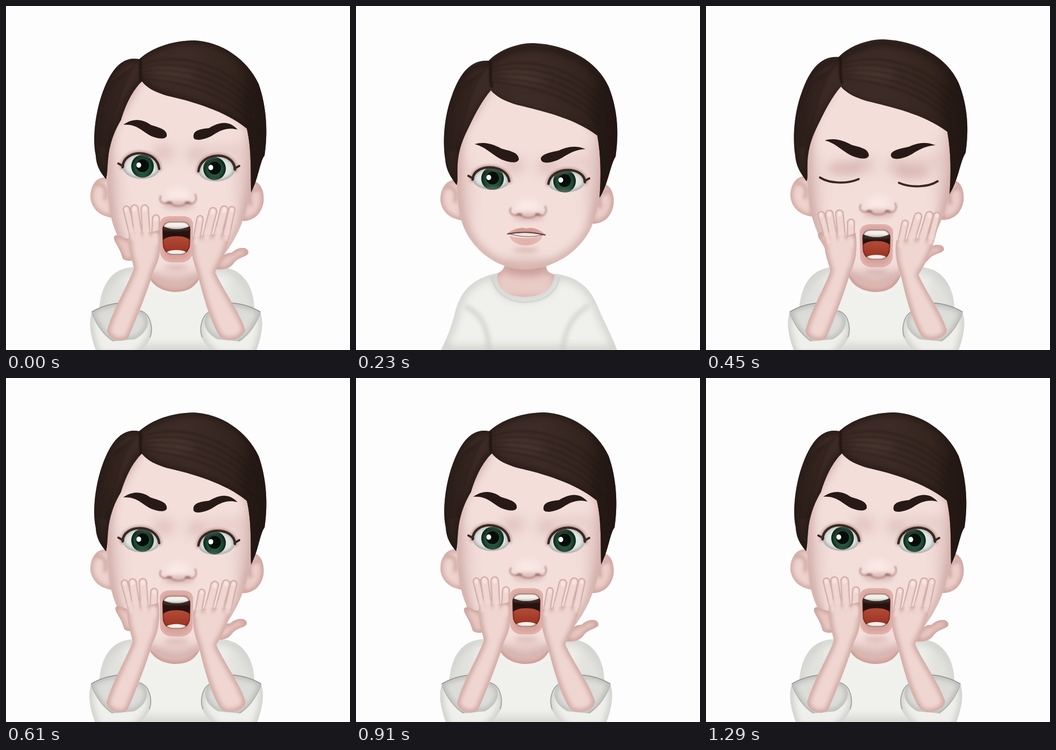
These frames come from a looping animation (640x640 px, 1370 ms). An HTML page with a canvas:

```html
<!DOCTYPE html>
<html lang="en">
<head>
<meta charset="utf-8">
<title>Shouting avatar</title>
<style>
  html, body { margin: 0; height: 100%; overflow: hidden; background: #fdfdfd; }
  canvas { display: block; width: 100vw; height: 100vh; }
</style>
</head>
<body>
<canvas width="640" height="640"></canvas>
<script>
const ctx = document.querySelector('canvas').getContext('2d');
const LOOP = 1370;
const STARTS = [0, 80, 150, 230, 300, 380, 450, 530, 610, 680, 760, 830, 910, 990, 1060, 1140, 1210, 1290];
const SKIN = '#f3deda', SKIN_EDGE = '#c9a29d', ROSE = 'rgba(200,160,158,.4)';
const SHIRT = '#f0f0ed', SHIRT_EDGE = '#cbcbc8', FOLD = 'rgba(178,178,174,.6)';
const LASH = '#3a2722';

const FIELDS = ['tilt', 'lift', 'eyeY', 'open', 'noseY', 'jaw', 'mouthY', 'reach', 'settle'];
const KEYS = [
  [80, .1, -3, 317, .87, 391, 0, 421, 300, 1],
  [230, 0, 0, 321, .87, 395, 0, 425, 300, 1],
  [300, 0, 1, 322, .6, 396, .1, 425, 200, 1],
  [380, 0, -4, 320, .05, 392, .8, 418, 50, 1],
  [450, 0, -7, 320, 0, 389, 1.15, 416, 0, 1],
  [530, .7, -2, 308, .5, 383, 1.1, 410, 0, .65],
  [610, .97, 0, 302, .94, 378, 1.05, 405, 0, .35],
  [680, 1, 0, 299, .99, 375, 1, 403, 0, .15],
  [760, 1, 0, 298, 1, 373, 1, 401, 0, 0]
];

const HAIR_LOW = 'M247 102 C265 82 300 69 330 69 C395 72 448 102 470 150 C488 195 489 240 483 280 C472 298 470 330 453 357 C456 320 456 280 449 241 C405 208 345 195 300 184 C280 178 262 170 251 157 C235 175 222 200 211 223 C200 245 191 265 189 295 C188 315 190 328 187 333 C180 322 168 310 166 285 C160 245 166 200 178 168 C192 128 212 99 247 102 Z';
const HAIR_HIGH = 'M248 99 C270 78 310 64 350 64 C400 66 448 98 470 145 C486 190 487 240 481 278 C472 290 470 320 456 347 C455 310 457 265 448 228 C408 195 345 177 300 167 C280 161 262 153 253 140 C235 157 222 185 214 212 C203 230 195 250 191 275 C188 300 189 315 186 322 C178 312 168 300 167 278 C160 245 167 195 180 160 C195 120 215 92 248 99 Z';
const FACE_SHUT = 'M195 235 C185 290 185 350 195 395 C205 435 245 488 315 490 C385 488 430 440 442 400 C459 350 464 290 455 235 L380 150 L250 140 Z';
const FACE_WIDE = 'M196 225 C186 290 186 350 196 395 C207 440 250 518 315 520 C375 518 425 445 440 400 C459 350 464 290 455 225 L380 140 L250 125 Z';
const BROWS_LOW = 'M221 257 C240 251 257 258 270 265 C285 270 302 271 303 285 C301 293 287 292 272 286 C253 277 243 263 221 257 Z M344 285 C343 276 362 272 377 269 C393 261 410 259 427 266 C408 267 395 275 384 282 C371 290 346 297 344 285 Z';
const BROWS_HIGH = 'M218 221 C238 207 255 211 269 221 C283 226 301 229 299 242 C296 249 282 247 270 242 C252 233 244 219 218 221 Z M349 245 C347 231 361 229 378 227 C397 216 414 212 431 230 C413 225 400 231 390 237 C375 248 352 253 349 245 Z';

const lerp = (a, b, t) => a + (b - a) * t;

function morph(from, to, t) {
  const ends = to.match(/[\d.]+/g);
  let i = 0;
  return new Path2D(from.replace(/[\d.]+/g, n => lerp(+n, +ends[i++], t).toFixed(2)));
}

function poseAt(time) {
  const last = KEYS.length - 1;
  let a = KEYS[last], b = a;
  const next = KEYS.findIndex(k => k[0] > time);
  if (time >= KEYS[0][0] && next > 0) { a = KEYS[next - 1]; b = KEYS[next]; }
  const t = a === b ? 0 : (time - a[0]) / (b[0] - a[0]);
  return Object.fromEntries(FIELDS.map((f, i) => [f, lerp(a[i + 1], b[i + 1], t)]));
}

function scoped(draw) {
  ctx.save();
  draw();
  ctx.restore();
}

function stroke(path, color, width, blur = 0) {
  scoped(() => {
    if (blur) ctx.filter = `blur(${blur}px)`;
    ctx.lineCap = ctx.lineJoin = 'round';
    ctx.strokeStyle = color;
    ctx.lineWidth = width;
    ctx.stroke(typeof path === 'string' ? new Path2D(path) : path);
  });
}

function blob(x, y, rx, ry, color, blur = 0, turn = 0) {
  scoped(() => {
    if (blur) ctx.filter = `blur(${blur}px)`;
    ctx.fillStyle = color;
    ctx.beginPath();
    ctx.ellipse(x, y, rx, ry, turn, 0, Math.PI * 2);
    ctx.fill();
  });
}

// Fills a shape, shades its rim softly and paints any details inside it.
function solid(shape, fill, edge, width, blur, details) {
  const path = typeof shape === 'string' ? new Path2D(shape) : shape;
  scoped(() => {
    ctx.fillStyle = fill;
    ctx.fill(path);
    ctx.clip(path);
    if (details) details();
    if (edge) stroke(path, edge, width, blur);
  });
}

function mirrored(draw) {
  draw();
  scoped(() => {
    ctx.translate(633, 0);
    ctx.scale(-1, 1);
    draw();
  });
}

function restBody() {
  solid('M277 470 C280 490 268 497 255 500 L262 545 L366 545 L374 500 C355 498 352 490 354 470 Z', '#e9cbc6', '#cfa6a1', 10, 6,
    () => blob(316, 487, 44, 16, 'rgba(180,125,120,.55)', 7));
  solid('M263 497 C215 507 195 530 184 570 C177 600 168 620 158 640 L486 640 C477 618 466 594 455 572 C440 530 420 505 370 498 C366 532 340 542 310 541 C280 540 260 525 263 497 Z',
    SHIRT, SHIRT_EDGE, 13, 8, () => {
      stroke('M206 560 C235 575 248 605 247 645', FOLD, 6, 4);
      stroke('M432 558 C402 575 387 605 384 645', FOLD, 6, 4);
      stroke('M253 506 C260 540 290 550 312 551 C345 551 372 537 378 506', FOLD, 2, 1);
    });
}

function raisedBody() {
  solid('M243 486 C205 484 176 508 173 570 L173 640 L462 640 L462 570 C464 530 445 488 400 486 Z',
    SHIRT, '#c9c9c5', 14, 9, () => {
      blob(205, 540, 22, 50, 'rgba(200,200,196,.35)', 10);
      blob(432, 540, 22, 50, 'rgba(200,200,196,.35)', 10);
    });
  solid('M262 492 C268 520 290 531 315 532 C342 532 360 518 364 492 Z', '#dcb5af', '#c3968f', 6, 3);
  stroke('M259 500 C268 526 292 536 315 537 C343 537 360 523 366 500', '#f3f2ef', 4);
}

function ears(dy) {
  scoped(() => {
    ctx.translate(0, dy);
    solid('M196 322 C174 311 156 330 157 357 C160 380 178 392 199 394 Z', '#efd3ce', '#cba19b', 8, 4);
    stroke('M170 333 C184 328 188 345 184 359', 'rgba(175,125,120,.6)', 5, 3);
    solid('M448 326 C470 320 482 340 479 366 C474 390 458 401 437 400 Z', '#eccdc8', '#c59a94', 8, 4);
    stroke('M468 341 C452 340 450 356 455 369', 'rgba(170,120,115,.6)', 5, 3);
  });
}

function head(p) {
  scoped(() => {
    ctx.translate(0, p.lift);
    ears(5 * (1 - p.tilt));
    const eyeY = p.eyeY - p.lift;
    solid(morph(FACE_SHUT, FACE_WIDE, p.jaw), SKIN, SKIN_EDGE, 13, 8, () => {
      blob(199, 365, 13, 85, ROSE, 12);
      blob(446, 330, 15, 85, ROSE, 12);
      blob(293, eyeY - 25, 20, 16, ROSE, 10);
      blob(356, eyeY - 22, 20, 16, ROSE, 10);
      blob(405, eyeY - 30, 32, 10, 'rgba(200,160,158,.25)', 9);
      blob(316, lerp(478, 504, p.jaw), 48, 12, 'rgba(200,155,150,.3)', 8);
    });
    hair(p.tilt);
    solid(morph(BROWS_LOW, BROWS_HIGH, p.tilt), '#271916');
  });
}

function hair(tilt) {
  const tone = ctx.createLinearGradient(165, 0, 485, 0);
  [[0, '#31231e'], [.2, '#3c2a25'], [.55, '#3c2b26'], [.8, '#35251f'], [1, '#231815']]
    .forEach(stop => tone.addColorStop(...stop));
  solid(morph(HAIR_LOW, HAIR_HIGH, tilt), tone, '#221714', 9, 6, () => {
    ctx.translate(0, 7 * (1 - tilt));
    blob(310, 125, 42, 13, 'rgba(80,64,57,.5)', 8, .1);
    blob(463, 230, 25, 105, 'rgba(30,20,17,.4)', 13);
    for (let i = 0; i < 5; i++) {
      const y = 88 + i * 13;
      stroke(`M252 ${110 + i * 6} C300 ${y} 390 ${y + 8} 455 ${y + 75}`, 'rgba(28,18,15,.3)', 3, 1.5);
      stroke(`M${238 - i * 7} ${112 + i * 5} C${216 - i * 7} 145 ${202 - i * 6} 185 ${190 - i * 4} 260`, 'rgba(28,18,15,.3)', 3, 1.5);
    }
    stroke('M247 92 C255 108 245 121 253 143', '#1d1310', 4, 1.5);
  });
}

// side: 1 puts the outer corner on the left, -1 on the right.
function eye(cx, cy, side, open) {
  const x = d => cx + d * side;
  if (open < .12) {
    blob(cx + 6 * side, cy - 18, 31, 14, 'rgba(195,152,150,.45)', 8);
    stroke(`M${x(-39)} ${cy - 1} C${x(-22)} ${cy + 10} ${x(10)} ${cy + 12} ${x(33)} ${cy + 2}`, LASH, 4);
    return;
  }
  const top = cy - 33 * open, low = cy + 30 * open;
  const lid = `M${x(-34)} ${cy + 2} C${x(-33)} ${top} ${x(30)} ${top} ${x(34)} ${cy + 5}`;
  const iris = cx + (side > 0 ? 3 : -4);
  stroke(lid, 'rgba(130,92,84,.6)', 8, 2.5);
  solid(`${lid} C${x(33)} ${low} ${x(-30)} ${low + 1} ${x(-34)} ${cy + 2} Z`, '#e3e6e3', '#8d908d', 5, 3, () => {
    const green = ctx.createRadialGradient(iris, cy + 7, 3, iris, cy, 21);
    green.addColorStop(0, '#2a6144');
    green.addColorStop(.65, '#1e4a32');
    green.addColorStop(1, '#0b2016');
    blob(iris, cy, 21, 21.5, green);
    blob(iris, cy - 1, 12, 12, '#060d0a');
    blob(iris - 7, cy - 2, 4.5, 5, '#ffffff', .4);
  });
  stroke(lid, LASH, 4.5);
  stroke(`M${x(-33)} ${cy} L${x(-42)} ${cy - 5}`, LASH, 4);
}

function nose(y) {
  scoped(() => {
    ctx.translate(0, y);
    blob(320, -18, 22, 18, 'rgba(252,236,232,.75)', 7);
    blob(321, -3, 28, 7, 'rgba(190,145,140,.55)', 5);
    stroke('M288 -19 C282 -7 296 -3 304 -8 C311 1 330 2 337 -8 C347 0 358 -10 352 -22', 'rgba(172,122,117,.7)', 3, 1.4);
    blob(304, -7, 6, 2.5, 'rgba(130,80,76,.5)', 1.5);
    blob(338, -7, 6, 2.5, 'rgba(130,80,76,.5)', 1.5);
  });
}

function closedMouth(y) {
  solid(`M286 ${y + 3} C300 ${y + 8} 330 ${y + 8} 346 ${y + 3} C342 ${y + 24} 294 ${y + 28} 286 ${y + 3} Z`, '#dda49e', '#e7bfba', 7, 4);
  solid(`M281 ${y - 1} C295 ${y - 12} 308 ${y - 14} 317 ${y - 11} C330 ${y - 15} 342 ${y - 8} 353 ${y + 1} Q318 ${y - 5} 281 ${y - 1} Z`, '#cc958f', '#d9aaa5', 4, 2);
  solid(`M284 ${y - 1} Q316 ${y - 8} 350 ${y + 1} Q318 ${y + 9} 284 ${y - 1} Z`, '#ebe6e0', '#7a4b46', 2, .6);
  stroke(`M282 ${y - 1} Q317 ${y - 8} 352 ${y + 1}`, '#6a3e39', 2, .5);
  blob(316, y + 29, 24, 4, 'rgba(175,125,120,.4)', 4);
}

function openMouth(top, jaw, tilt) {
  const low = top + lerp(55, 61, tilt) * Math.min(jaw, 1);
  const ring = (g, up, down) => {
    const t = top - up, b = low + down;
    return `M${291 - g} ${t + 14} Q${293 - g} ${t} 307 ${t} L328 ${t} Q${341 + g} ${t} ${343 + g} ${t + 14} L${342 + g} ${b - 16} Q${337 + g} ${b} 324 ${b} L310 ${b} Q${297 - g} ${b} ${292 - g} ${b - 16} Z`;
  };
  solid(ring(5, 10, 15), '#d9a19a', '#e6bfba', 6, 4);
  blob(317, low + 24, 22, 5, 'rgba(190,140,135,.35)', 4);
  solid(ring(0, 0, 1), '#27120f', '#4f221b', 2, 1, () => {
    blob(317, top + 3, 28, 11, '#f3f0ea');
    stroke(`M291 ${top + 13} Q317 ${top + 16} 343 ${top + 13}`, 'rgba(100,90,85,.6)', 4, 2);
    const tongue = ctx.createLinearGradient(0, low - 34, 0, low);
    tongue.addColorStop(0, '#b34c38');
    tongue.addColorStop(1, '#982f20');
    solid(`M291 ${low} L291 ${low - 24} C294 ${low - 37} 340 ${low - 37} 343 ${low - 24} L343 ${low} Z`, tongue);
    blob(317, low + 3, 24, 11, '#f3f0ea');
  });
}

function cuff() {
  solid('M160 570 C175 558 200 553 215 552 L252 568 C270 576 275 602 270 615 C262 632 250 644 235 652 L172 652 C158 620 152 590 160 570 Z',
    '#efefec', '#c6c6c3', 10, 6);
  solid('M160 569 C180 557 205 552 220 552 L252 568 C272 580 266 606 240 620 L198 624 C178 610 168 590 160 569 Z',
    '#dcdcd9', '#b5b5b2', 8, 5);
  stroke('M160 569 C178 558 200 553 218 552', '#8f8f8c', 1.5);
  stroke('M160 571 C168 592 181 612 200 623', '#aeaeab', 1.5);
  stroke('M250 567 C270 573 274 600 268 616', '#9b9b98', 1.5);
}

function finger([x1, y1, x2, y2, width]) {
  const line = `M${x1} ${y1} L${x2} ${y2}`;
  stroke(line, '#c79f99', width + 1, .6);
  stroke(line, '#f0d6d1', width - 2.5, .8);
  stroke(`M${x1} ${y1 - 1} l0 3`, 'rgba(250,232,228,.8)', width - 8, 1);
}

// Leans and shortens the raised arm about its elbow as it settles.
function hand(arm, thumb, fingers, side, elbowX, settle) {
  scoped(() => {
    ctx.translate(elbowX - 3 * settle * side, 612);
    ctx.rotate(-.03 * settle * side);
    ctx.scale(1, 1 - .045 * settle);
    ctx.translate(-elbowX, -612);
    scoped(() => {
      ctx.translate(16 * settle * side, -14 * settle);
      solid(thumb, '#e9c8c2', '#bd908a', 6, 4);
    });
    fingers.forEach(finger);
    solid(arm, '#f0d6d1', '#c79d97', 9, 5);
    fingers.forEach(([x1, y1, x2, y2, width]) =>
      stroke(`M${lerp(x1, x2, .75)} ${lerp(y1, y2, .75)} L${x2} ${y2 + 2}`, '#f0d6d1', width - 4, 2));
  });
}

function arms(p) {
  scoped(() => {
    ctx.translate(0, p.reach);
    mirrored(() => scoped(() => {
      ctx.translate(-4 * p.settle, 0);
      cuff();
    }));
    hand('M229 422 C226 450 234 468 238 488 C229 515 201 560 188 603 C190 622 215 628 227 618 C240 588 262 535 275 492 C287 470 290 445 287 415 C270 425 245 418 229 422 Z',
      'M201 429 C199 438 211 446 217 470 C222 475 232 475 240 472 L232 432 C222 437 212 423 203 427 Z',
      [[224, 378, 237, 430, 13], [239, 377, 246, 428, 15], [258, 377, 261, 428, 15], [279, 395, 277, 438, 14]], 1, 208, p.settle);
    hand('M346 430 C342 462 351 482 357 501 C368 545 380 585 396 612 C405 629 442 622 445 602 C435 570 405 530 389 495 C398 480 411 455 416 428 C398 420 365 427 346 430 Z',
      'M390 490 C394 470 406 458 420 459 C432 447 452 447 451 460 C446 468 434 466 424 478 C416 490 404 491 390 490 Z',
      [[420, 379, 409, 430, 13], [406, 379, 393, 430, 15], [385, 382, 373, 430, 15], [361, 396, 354, 438, 13]], -1, 420, p.settle);
  });
}

function draw(time) {
  const p = poseAt(time);
  ctx.fillStyle = '#fdfdfd';
  ctx.fillRect(0, 0, 640, 640);
  if (p.reach < 120) raisedBody(); else restBody();
  head(p);
  eye(251, p.eyeY, 1, p.open);
  eye(392, p.eyeY + lerp(7, 4.5, p.open), -1, p.open);
  nose(p.noseY);
  if (p.jaw < .2) closedMouth(p.mouthY); else openMouth(p.mouthY, p.jaw, p.tilt);
  if (p.reach < 250) arms(p);
}

let shown = -1;
function tick() {
  const now = performance.now() % LOOP;
  const start = STARTS.findLast(t => t <= now);
  if (start !== shown) draw(shown = start);
  requestAnimationFrame(tick);
}
tick();
</script>
</body>
</html>
```
